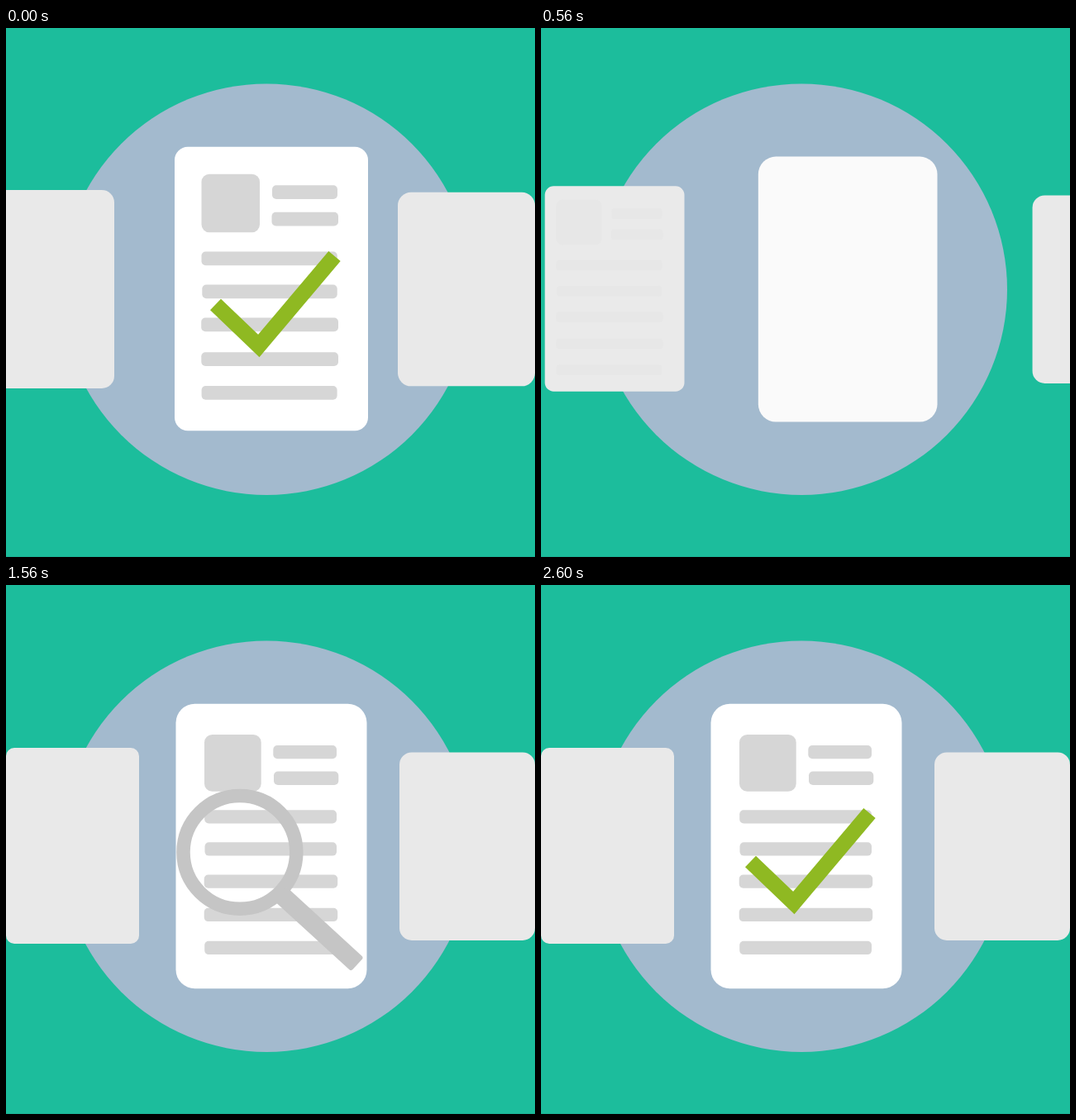
An HTML page with a canvas that plays this animation: 640 px wide and 640 px high, repeating every 2920 ms.

```html
<!DOCTYPE html>
<html lang="en">
<head>
<meta charset="utf-8">
<title>Document check</title>
<style>
  html, body { margin: 0; height: 100%; overflow: hidden; background: #1cbd9c; }
  canvas { display: block; width: 100vmin; height: 100vmin; }
</style>
</head>
<body>
<canvas id="stage" width="640" height="640"></canvas>
<script>
const ctx = document.getElementById('stage').getContext('2d');
const LOOP = 2920, STEP = 40;

const clamp = v => Math.min(1, Math.max(0, v));
const span = (t, from, to) => clamp((t - from) / (to - from));
const mix = (a, b, p) => a + (b - a) * p;
const sine = p => (1 - Math.cos(Math.PI * p)) / 2;
const ease = (t, from, to) => sine(span(t, from, to));
const grey = v => `rgb(${v},${v},${v})`;

// Page contents: photo [x, y, size], then lines [x, y, width]
const checkedPage = {
  photo: [236.5, 176.8, 70.5], height: 16.7,
  lines: [[322, 190.3, 79], [321.5, 222.7, 80.5], [236.5, 270.5, 164.3], [237.3, 310.5, 163.4],
          [236.2, 350.6, 165.8], [236.3, 392.2, 165.7], [236.6, 433, 164]]
};
const newPage = {
  photo: [240, 181, 68.7], height: 16.3,
  lines: [[323.3, 194, 76.7], [324, 225.6, 78.3], [240.2, 272.2, 159.8], [240.5, 311.3, 159.5],
          [239.7, 350.5, 161.5], [239.7, 390.8, 161.5], [240.2, 430.8, 159.8]]
};

function box(x, y, w, h, r, color) {
  ctx.fillStyle = color;
  ctx.beginPath();
  ctx.roundRect(x, y, w, h, r);
  ctx.fill();
}

// Card given by its centre
function card(cx, cy, w, h, r, shade) {
  box(cx - w / 2, cy - h / 2, w, h, r, grey(shade));
}

function placed(x, y, scale, alpha, originX, originY, draw) {
  ctx.save();
  ctx.globalAlpha = alpha;
  ctx.translate(x, y);
  ctx.scale(scale, scale);
  ctx.translate(-originX, -originY);
  draw();
  ctx.restore();
}

function contents(page, photoGrow, lineGrow) {
  const alpha = ctx.globalAlpha;
  const [px, py, size] = page.photo, s = size * photoGrow, inset = (size - s) / 2;
  if (s > 0) box(px + inset, py + inset, s, s, 9.5, '#d6d6d6');
  page.lines.forEach(([x, y, w], i) => {
    const g = lineGrow(i);
    if (!g) return;
    ctx.globalAlpha = alpha * g;
    box(x, y, w * g, page.height, 5, '#d6d6d6');
  });
}

function checkmark(drawn) {
  if (!drawn) return;
  ctx.strokeStyle = '#8fb922';
  ctx.lineWidth = 18.8;
  ctx.setLineDash(drawn < 1 ? [215 * drawn, 300] : []);
  ctx.beginPath();
  ctx.moveTo(253.5, 334.5);
  ctx.lineTo(305.8, 384.5);
  ctx.lineTo(397.5, 276);
  ctx.stroke();
}

function magnifier(x, y) {
  ctx.save();
  ctx.translate(x, y);
  ctx.strokeStyle = '#c5c5c5';
  ctx.lineWidth = 16.5;
  ctx.beginPath();
  ctx.arc(0, 0, 68.4, 0, 7);
  ctx.stroke();
  ctx.rotate(42.5 * Math.PI / 180);
  box(70, -7.2, 126.5, 22.4, 3, '#c5c5c5');
  ctx.restore();
}

function magnifierPath(t) {
  if (t <= 1120) {
    const rest = (1 - span(t, 720, 1120)) ** 2 / 0.49;
    return [281.2 + 166.6 * rest, 217.3 + 162 * rest];
  }
  if (t <= 1200) return [281.2, mix(217.3, 206, ease(t, 1120, 1200))];
  if (t <= 1680) return [mix(281.2, 283.2, ease(t, 1200, 1680)), mix(206, 343.5, ease(t, 1200, 1680))];
  const down = ease(t, 1680, 2040), out = span(t, 2240, 2480) ** 2;
  return [mix(283.2, 286.7, down) + 400 * out, mix(343.5, 418, down) + 390 * out];
}

function backdrop() {
  ctx.fillStyle = '#1cbd9c';
  ctx.fillRect(0, 0, 640, 640);
  ctx.fillStyle = '#1bb094';
  ctx.fillRect(0, 639, 640, 1);
  ctx.fillStyle = '#a3bace';
  ctx.beginPath();
  ctx.arc(315.2, 316.2, 248.8, 0, 7);
  ctx.fill();
}

function render(t) {
  backdrop();

  // Old card leaves on the left, next one arrives on the right
  const settle = ease(t, 840, 1080);
  card(49 - 175 * ease(t, 0, 400), 316, 164, 240, 15, 233);
  card(mix(730, 551.3, ease(t, 420, 800)) + 6.7 * settle, 316.2, 164, 227.5, 15, 233);

  // Checked page shrinks to the left and loses its contents
  const move = ease(t, 0, 637), shrink = ease(t, 0, 711);
  card(mix(321, 80.5, move), 315.5, mix(234, 161, shrink), mix(343.5, 237, shrink),
       mix(16, 10, shrink), mix(255, 233, move));
  placed(319 - 245 * move, 316, 1 - 0.247 * shrink, 1 - span(t, 330, 600), 319, 316,
         () => contents(checkedPage, 1, () => 1));
  placed(326 - 266 * move, 334 - 5 * move, 1 - 0.438 * shrink, 1 - span(t, 280, 510), 326, 334,
         () => checkmark(1));

  // Blank page grows into the centre, then fills in
  const enter = ease(t, 0, 813);
  const cx = mix(557, 318.6, enter) + 2.4 * settle;
  card(cx, 316.1, mix(166, 231, enter), mix(234.5, 345.5, enter) - settle,
       mix(16, 23, enter), mix(233, 255, enter));
  placed(cx, 316.1, mix(0.7, 1, enter), 1, 321, 316.1,
         () => contents(newPage, sine(span(t, 620, 880)), i => span(t, 620 + 18 * i, 760 + 18 * i)));

  checkmark(ease(t, 2400, 2600));
  if (t > 720 && t < 2480) magnifier(...magnifierPath(t));
}

function tick() {
  const t = performance.now() % LOOP;
  render(Math.floor(t / STEP) * STEP);
  requestAnimationFrame(tick);
}
tick();
</script>
</body>
</html>
```
